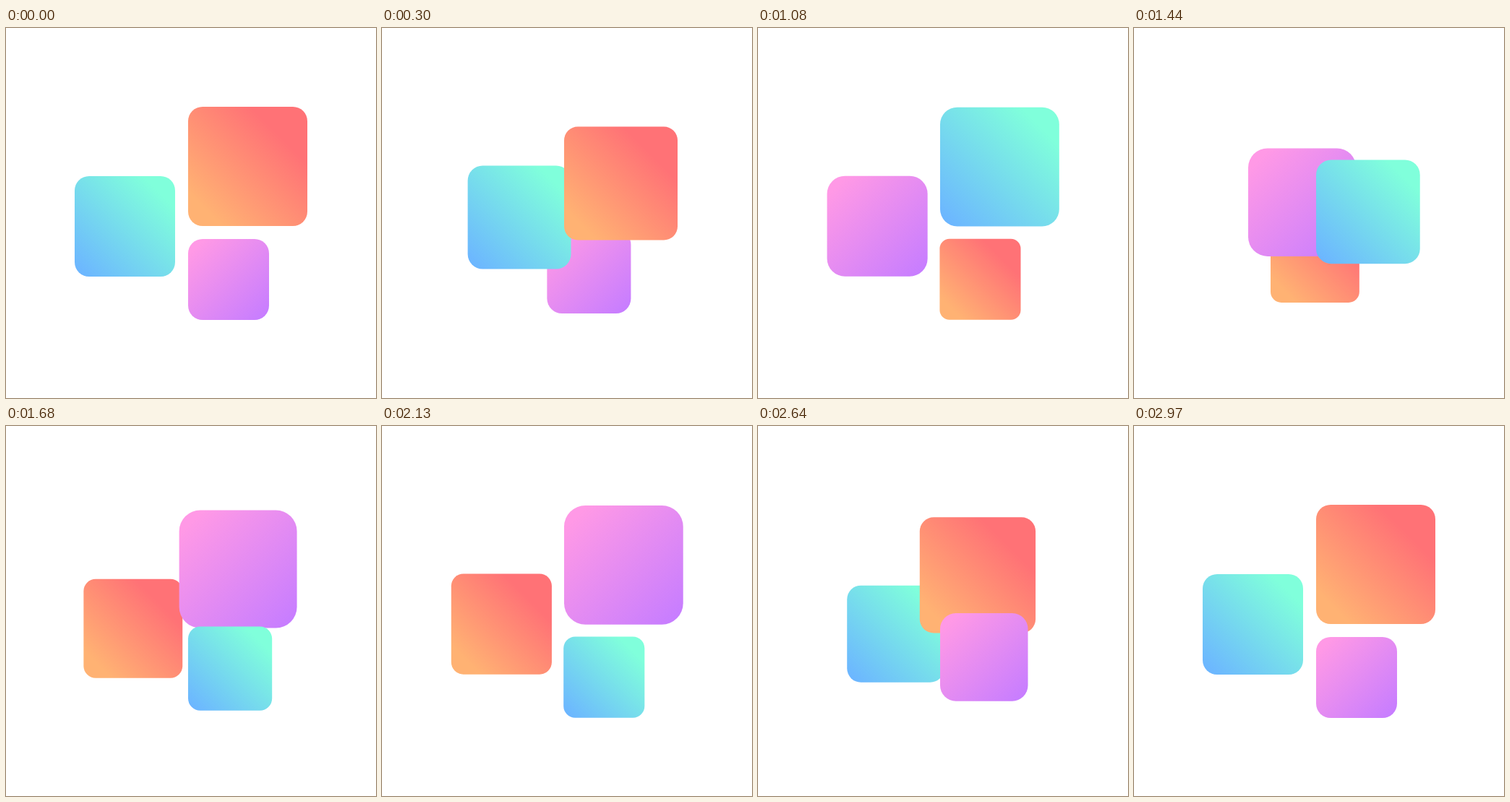
An HTML page with a canvas that plays this animation: 512 px wide and 512 px high, repeating every 3150 ms.

```html
<!DOCTYPE html>
<html lang="en">
<head>
<meta charset="utf-8">
<title>Three tiles</title>
<style>
html, body { margin: 0; width: 100%; height: 100%; overflow: hidden; background: #fff; }
canvas { display: block; width: 100vw; height: 100vh; }
</style>
</head>
<body>
<canvas id="stage" width="512" height="512"></canvas>
<script>
const ctx = document.getElementById('stage').getContext('2d');
const LOOP = 3150, STEP = 30;

// Places a tile can rest in: centre and side length
const BIG = { x: 334.5, y: 191.5, s: 165 };
const LEFT = { x: 164.5, y: 274.5, s: 139 };
const SMALL = { x: 308, y: 348, s: 112 };

// Gradient runs from (x0, y0) to (x1, y1) in tile units; base is the side at which the radius is 20
const orange = { base: 165, from: '#ffb273', to: '#ff7276', axis: [.14, .86, .76, .24] };
const cyan = { base: 139, from: '#6cb6ff', to: '#80ffdb', axis: [.05, .95, .84, .16] };
const purple = { base: 112, from: '#ff99e6', to: '#c77dff', axis: [.1, .1, .95, .95] };

// Every move sends the first tile BIG to SMALL, the second LEFT to BIG, the third SMALL to LEFT
const moves = [
  { start: 0, length: 882, tiles: [orange, cyan, purple] },
  { start: 1020, length: 900, tiles: [cyan, purple, orange] },
  { start: 2058, length: 912, tiles: [purple, orange, cyan] }
];

// cubic-bezier(.67, 0, .33, 1)
function ease(x) {
  if (x <= 0) return 0;
  if (x >= 1) return 1;
  let lo = 0, hi = 1;
  for (let i = 0; i < 24; i++) {
    const t = (lo + hi) / 2, u = 1 - t;
    if (3 * u * u * t * .67 + 3 * u * t * t * .33 + t * t * t < x) lo = t;
    else hi = t;
  }
  return lo * lo * (3 - 2 * lo);
}

function drawTile(tile, a, b, p) {
  const mix = key => a[key] + (b[key] - a[key]) * p;
  const s = mix('s'), x = mix('x') - s / 2, y = mix('y') - s / 2;
  const [x0, y0, x1, y1] = tile.axis;
  const fill = ctx.createLinearGradient(x + x0 * s, y + y0 * s, x + x1 * s, y + y1 * s);
  fill.addColorStop(0, tile.from);
  fill.addColorStop(1, tile.to);
  ctx.fillStyle = fill;
  ctx.beginPath();
  ctx.roundRect(x, y, s, s, 20 * s / tile.base);
  ctx.fill();
}

function draw(now) {
  const t = Math.floor((now % LOOP) / STEP) * STEP;
  const { start, length, tiles } = moves.findLast(m => t >= m.start);
  const p = ease((t - start) / length);
  ctx.fillStyle = '#fff';
  ctx.fillRect(0, 0, 512, 512);
  drawTile(tiles[2], SMALL, LEFT, p);
  drawTile(tiles[1], LEFT, BIG, p);
  drawTile(tiles[0], BIG, SMALL, p);
}

let origin;
function tick(now) {
  origin ??= now;
  draw(now - origin);
  requestAnimationFrame(tick);
}
draw(0);
requestAnimationFrame(tick);
</script>
</body>
</html>
```
